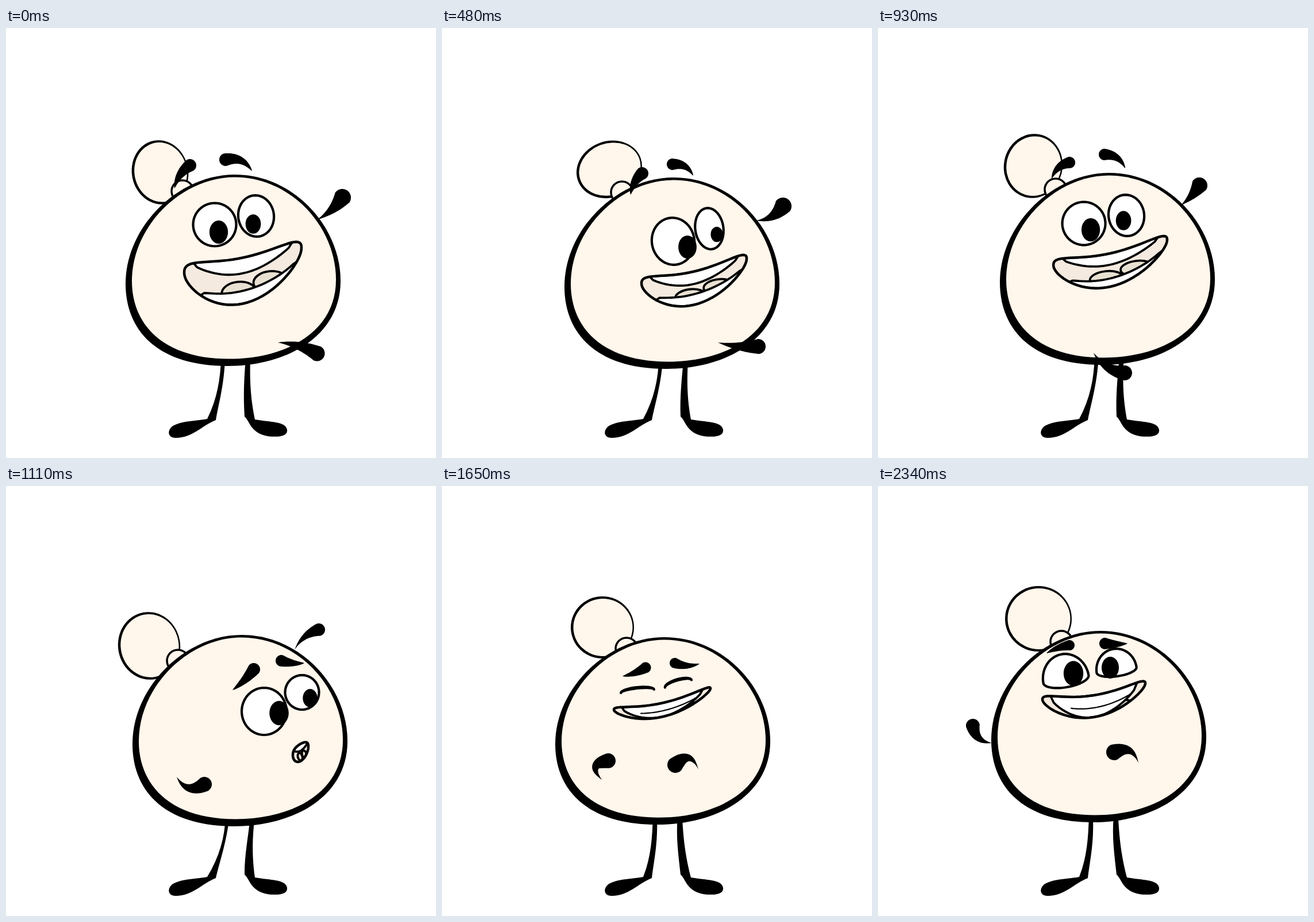
Recreate the animation shown at these times as an HTML page. Size 748 px wide and 748 px high, loop 2430 ms.

```html
<!DOCTYPE html>
<html lang="en">
<head>
<meta charset="utf-8">
<title>Round fellow</title>
<style>
html, body { margin: 0; width: 100%; height: 100%; overflow: hidden; background: #fff; }
svg { display: block; width: 100vw; height: 100vh; }
</style>
</head>
<body>
<svg id="stage" viewBox="0 0 748 748" stroke-linejoin="round" stroke-linecap="round">
  <defs><clipPath id="lips"><path id="lipsPath"/></clipPath></defs>
</svg>
<script>
const LOOP = 2430, STEP = 30;
const SKIN = '#fff6ec', MOUTH = '#f4eadf', TONGUE = '#e8e1d2', INK = '#000', WHITE = '#fff';

// Start and end of each move from one pose to the next
const MOVES = [[90, 420], [520, 690], [920, 1110], [1200, 1450], [1490, 1630], [1970, 2190]];

const stage = document.getElementById('stage');
const lipsPath = document.getElementById('lipsPath');
const updates = [];
const mix = (a, b, k) => a.map((v, i) => v + (b[i] - v) * k);
const hump = u => 4 * u * (1 - u);
const ease = k => k < .5 ? 4 * k ** 3 : 1 - 4 * (1 - k) ** 3;

function set(el, attrs) {
  for (const name in attrs) el.setAttribute(name, attrs[name]);
  return el;
}

function add(tag, attrs, parent = stage) {
  return parent.appendChild(set(document.createElementNS('http://www.w3.org/2000/svg', tag), attrs));
}

// One row per pose; draw gets the blended row
function animate(poses, draw) {
  updates.push((i, k) => draw(k ? mix(poses[i], poses[i + 1], k) : poses[i]));
}

// Samples f over the range from a to b
const sample = (f, a, b, n = 28) =>
  Array.from({ length: n + 1 }, (_, i) => f(a + (b - a) * i / n));
const trace = pts => 'M' + pts.map(p => p.map(v => v.toFixed(2))).join('L');

// Teardrop along a bent spine: tip, centre of the round end, radius, bend
function drop(taper, poses) {
  const el = add('path', { fill: INK });
  animate(poses, ([x, y, ex, ey, r, bend]) => {
    const len = Math.hypot(ex - x, ey - y);
    const cx = (x + ex) / 2 - (ey - y) / len * bend;
    const cy = (y + ey) / 2 + (ex - x) / len * bend;
    const side = s => t => {
      const dx = (1 - t) * (cx - x) + t * (ex - cx), dy = (1 - t) * (cy - y) + t * (ey - cy);
      const w = s * r * t ** taper / Math.hypot(dx, dy), q = 1 - t;
      return [q * q * x + 2 * q * t * cx + t * t * ex - dy * w, q * q * y + 2 * q * t * cy + t * t * ey + dx * w];
    };
    const end = Math.atan2(ey - cy, ex - cx);
    const cap = a => [ex + r * Math.cos(end + a), ey + r * Math.sin(end + a)];
    el.setAttribute('d', trace([
      ...sample(side(-1), 0, 1), ...sample(cap, -Math.PI / 2, Math.PI / 2), ...sample(side(1), 1, 0)
    ]) + 'Z');
  });
}

// Eye: centre, half width, height above and below, tilt, pupil offset
function eye(poses) {
  const white = add('path', { fill: WHITE, stroke: INK, 'stroke-width': 4.2 });
  const pupil = add('ellipse', { fill: INK });
  animate(poses, ([x, y, rx, up, down, tilt, px, py]) => {
    const rim = a => [rx * Math.cos(a), Math.sin(a) * (a < 0 ? up : down)];
    set(white, {
      d: trace(sample(rim, -Math.PI, Math.PI, 56)) + 'Z',
      transform: `translate(${x} ${y}) rotate(${tilt})`
    });
    const r = Math.min(.43 * rx, .36 * (up + down));
    set(pupil, { cx: x + px, cy: y + py, rx: r, ry: r * 1.26 });
  });
}

// Legs: feet stay planted, hips follow the body
const legL = add('path', { fill: INK }), legR = add('path', { fill: INK });
function drawLegs(d) {
  const h = d / 2;
  legL.setAttribute('d', `M${375 + d} 575C${374 + d} 610 ${368 + h} 645 350 680` +
    'C330 684 305 683 289 693C279 702 283 713 295 713C325 713 340 692 365 682' +
    `C${371 + h / 2} 650 ${380 + h} 620 ${382 + d} 575Z`);
  legR.setAttribute('d', `M${418 + d} 575C${415 + d} 610 ${413 + h / 2} 640 415 676` +
    'C425 685 425 704 455 710C480 713 490 708 489 699C487 684 460 686 433 681' +
    `C${427 + h / 2} 650 ${424 + h} 620 ${426 + d} 575Z`);
}

// Hair bun: centre, radii, tilt, then the centre of its tie
const bun = add('ellipse', { fill: INK }), bunFill = add('ellipse', { fill: SKIN });
const tie = add('circle', { r: 19, fill: SKIN, stroke: INK, 'stroke-width': 3.5 });
animate([
  [268, 251, 49, 56, -12, 307, 284],
  [291, 246, 58, 49, -20, 313, 286],
  [270, 240, 51, 56, 12, 309, 281],
  [249, 278, 54, 59, -10, 299, 304],
  [253, 268, 56, 58, 0, 302, 299],
  [279, 246, 55, 54, 0, 321, 283],
  [279, 231, 58, 57, 0, 319, 271]
], ([cx, cy, rx, ry, tilt, tx, ty]) => {
  const transform = `rotate(${tilt} ${cx} ${cy})`;
  set(bun, { cx, cy, rx, ry, transform });
  set(bunFill, { cx: cx + 1, cy, rx: rx - 3.5, ry: ry - 4, transform });
  set(tie, { cx: tx, cy: ty });
});

// Body: left, top and height
const body = add('g', {});
add('path', { fill: INK, d: 'M190 0C292 0 374 90 374 185C374 280 282 333 177 333' +
  'C54 333 0 270 0 190C0 90 92 0 190 0Z' }, body);
add('path', { fill: SKIN, d: 'M190 4.5C289 5 366 92 366 183C366 273 280 320.5 180 320.5' +
  'C64 320.5 11 260 11 185C11 90 97 4.5 190 4.5Z' }, body);
animate([
  [208, 255, 333], [213, 260, 333], [212, 252, 334], [220, 259, 333],
  [215, 259, 333], [197, 263, 326], [197, 252, 333]
], ([x, y, h]) => {
  body.setAttribute('transform', `translate(${x} ${y}) scale(1 ${h / 333})`);
  drawLegs((x - 208) * .65 - 1);
});

// Mouth: both corners, sag, half height, depth of upper and lower teeth, bite line
const mouth = add('g', { 'clip-path': 'url(#lips)' });
const cavity = add('path', { fill: MOUTH }, mouth);
const ink = { stroke: INK, 'stroke-width': 3.8 };
const tongues = [[.735, .55], [.465, .47]].map(([u, v]) =>
  ({ u, v, el: add('ellipse', { fill: TONGUE, ...ink }, mouth) }));
const upper = add('path', { fill: WHITE, ...ink }, mouth);
const lower = add('path', { fill: WHITE, ...ink }, mouth);
const bite = add('path', { fill: 'none', stroke: INK }, mouth);
const rim = add('path', { fill: 'none', stroke: INK, 'stroke-width': 4.5 });
animate([
  [310, 425, 514, 382, 36, 40, .68, .56, 0],
  [347, 444, 530, 401, 30, 29, .75, .64, 0],
  [305, 412, 503, 368, 31, 29, .68, .5, 0],
  [499, 468, 526, 453, 3, 15, .8, 0, 0],
  [436, 481, 516, 437, -7, 9, 2, 0, 0],
  [299, 389, 467, 352, 19, 12, 2, 0, 1],
  [286, 371, 465, 343, 26, 19, 2, 0, 1]
], ([x1, y1, x2, y2, sag, half, top, low, line]) => {
  // u runs from corner to corner, v from upper lip (-1) to lower lip (1)
  const at = (u, v) => [x1 + (x2 - x1) * u,
    y1 + (y2 - y1) * u + sag * hump(u) + v * half * Math.max(0, hump(u)) ** .45];
  const arc = a => at((1 - Math.cos(a)) / 2, a < Math.PI ? -1 : 1);
  const lips = trace(sample(arc, 0, 2 * Math.PI, 72)) + 'Z';
  [cavity, lipsPath, rim].forEach(el => el.setAttribute('d', lips));

  const band = (a, b, lip, depth) => {
    const inner = w => at(a + (b - a) * w, lip * (1 - depth * Math.max(0, hump(w)) ** .4));
    return trace([...sample(u => at(u, lip), a, b), ...sample(inner, 1, 0)]) + 'Z';
  };
  upper.setAttribute('d', band(.08, .92, -1, top));
  lower.setAttribute('d', band(.14, .96, 1, low));
  set(bite, { d: trace(sample(u => at(u, .15), .28, .86)), 'stroke-width': 2.2 * line });

  const tilt = Math.atan2(y2 - y1, x2 - x1) * 180 / Math.PI;
  for (const { u, v, el } of tongues) {
    const [x, y] = at(u, v);
    set(el, { rx: .145 * (x2 - x1), ry: .45 * half, transform: `translate(${x} ${y}) rotate(${tilt / 2})` });
  }
});

// Eyes, left then right
eye([
  [363, 342, 37.5, 37.5, 37.5, 0, 7, 13],
  [402, 371, 37, 41, 41, -10, 25, 10],
  [358, 340, 37.5, 37.5, 37.5, 0, 12, 11],
  [449, 392, 39, 41, 41, 0, 26, 3],
  [419, 414, 39, 20, 16, -22, 11, -12],
  [340, 357, 29, 7, -5, -6, 0, -6],
  [327, 336, 40, 44, 14, -10, 13, -10]
]);
eye([
  [435, 327, 31, 36, 36, -8, -5, 14],
  [465, 349, 24.5, 36, 36, -8, 13, 10],
  [432, 326, 31, 36, 36, -8, -5, 9],
  [515, 359, 29.5, 30, 30, 0, 14, 10],
  [495, 385, 32, 20, 14, -16, -9, -4],
  [411, 344, 24, 8, -6, -16, 0, -7],
  [415, 320, 35, 37, 11, -8, -11, -4]
]);

// Brows, left then right
drop(.8, [
  [293, 279, 320, 239, 11, -10], [328, 290, 348, 253, 11, -8],
  [302, 262, 333, 234, 10, -12], [394, 355, 431, 319, 11, 4],
  [382, 390, 426, 355, 11, -6], [314, 331, 354, 316, 9.5, 4], [293, 291, 333, 277, 9, -4]
]);
drop(.8, [
  [428, 249, 382, 229, 11, 18], [437, 257, 401, 237, 10, 14],
  [430, 244, 394, 220, 10, 14], [519, 308, 479, 304, 10, -4],
  [511, 344, 462, 342, 11, -8], [448, 309, 405, 308, 9, -8], [434, 274, 395, 274, 10, -2]
]);

// Arms
drop(1.2, [
  [540, 334, 585, 295, 15, 8], [545, 335, 593, 310, 15, 14],
  [526, 309, 559, 274, 14, 5], [502, 285, 544, 250, 11, -12],
  [573, 373, 605, 403, 14, -20], [446, 493, 406, 485, 14, 32], [453, 482, 411, 463, 14, 26]
]);
drop(1, [
  [473, 547, 541, 566, 13.5, -8], [480, 547, 550, 554, 13, 6],
  [375, 565, 429, 600, 13, 16], [297, 506, 345, 519, 13, 26],
  [304, 521, 361, 521, 13, 34], [278, 511, 289, 478, 13, -34], [198, 447, 165, 417, 12, -18]
]);

function render(ms) {
  const t = Math.floor(ms % LOOP / STEP) * STEP;
  const i = MOVES.filter(([, to]) => t >= to).length;
  const [from, to] = MOVES[i] || [LOOP, LOOP + 1];
  const k = t > from ? ease((t - from) / (to - from)) : 0;
  updates.forEach(update => update(i, k));
}

const began = performance.now();
function tick() {
  render(performance.now() - began);
  requestAnimationFrame(tick);
}
tick();
</script>
</body>
</html>
```
